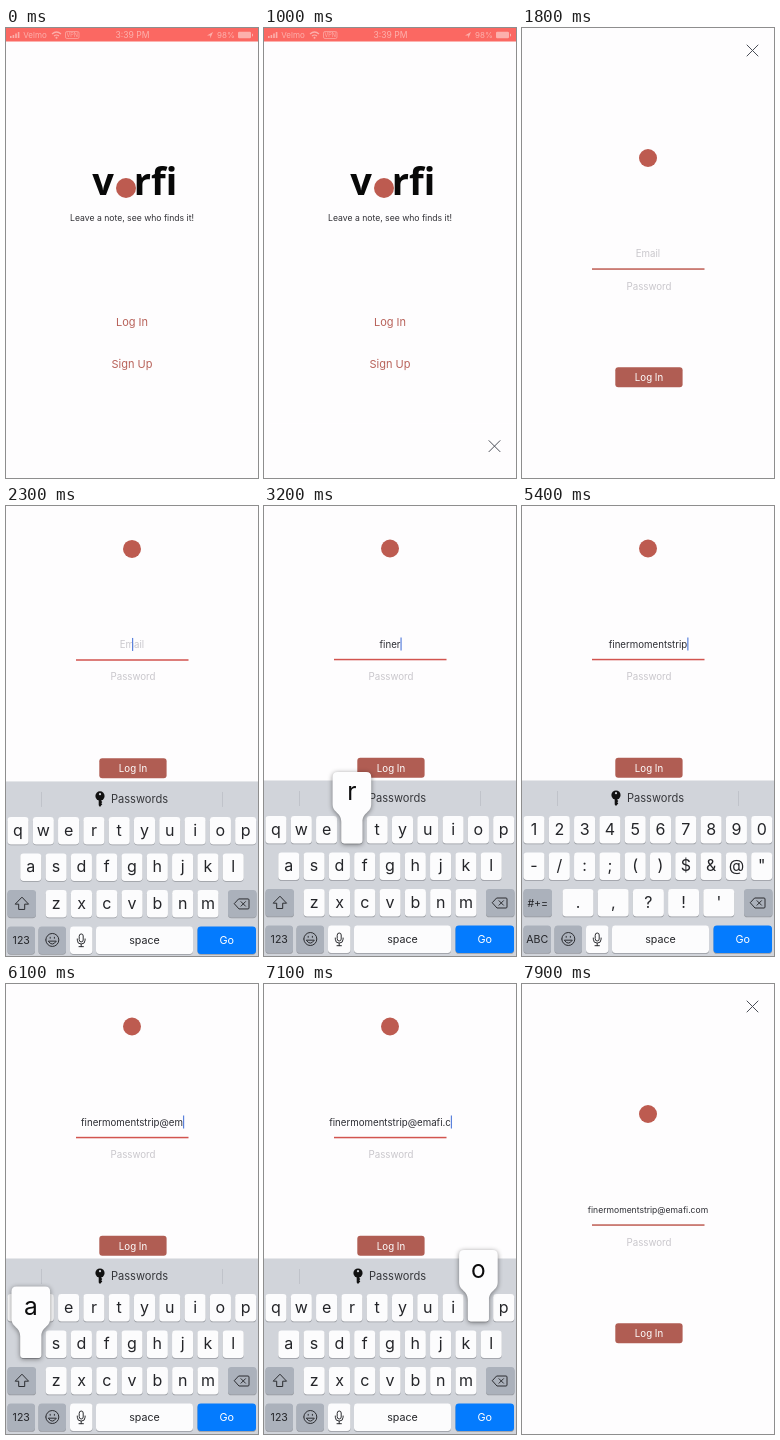
Recreate the animation shown at these times as an HTML page. Size 252x450 px, loop 8 s.

```html
<!DOCTYPE html>
<html lang="en">
<head>
<meta charset="utf-8">
<title>Log in</title>
<style>
html, body { margin: 0; width: 100%; height: 100%; overflow: hidden; background: #fefdfe; }
svg { display: block; width: 100%; height: 100%; }
text { font-family: Inter, sans-serif; text-anchor: middle; }
.line { fill: none; stroke: #2c2d31; stroke-width: 1; stroke-linecap: round; stroke-linejoin: round; }
.red { fill: #bd5b50; }
.link { fill: #b8625a; }
.hint { fill: #c9c7cc; }
</style>
</head>
<body>
<svg viewBox="0 0 252 450" xmlns="http://www.w3.org/2000/svg">
  <g id="welcome">
    <rect width="252" height="450" fill="#fefdfe"/>
    <rect width="252" height="13.5" fill="#fb6862"/>
    <g fill="#fcb0ac" font-size="8">
      <path d="M4 10V8h1.6v2zM6.6 10V7h1.6v3zM9.2 10V5.5h1.6V10zM11.8 10V4h1.6v6z"/>
      <text x="29" y="10">Velmo</text>
      <path d="M46 6q4.5-4 9 0M48 8q2.5-2 5 0" fill="none" stroke="#fcb0ac" stroke-width="1.2"/>
      <circle cx="50.5" cy="9.7" r="1"/>
      <rect x="59.5" y="3.5" width="13.5" height="7" rx="1.5" fill="none" stroke="#fcb0ac" stroke-width=".7"/>
      <text x="66.2" y="9" font-size="5.5">VPN</text>
      <text x="126.500" y="10" font-size="8.6">3:39 PM</text>
      <path d="M201 7.5l6-3.5-2.800 6.500v-3z"/>
      <text x="220" y="10">98%</text>
      <rect x="232" y="3.8" width="13" height="6.5" rx="1.2"/>
      <rect x="246" y="5.8" width="1" height="2.5"/>
    </g>
    <g font-size="38" font-weight="600" fill="#080808">
      <text x="97" y="167" style="font-family:'Noto Sans',sans-serif">v</text>
      <text x="149.500" y="167" style="font-family:'Noto Sans',sans-serif">rfi</text>
    </g>
    <circle class="red" cx="120" cy="160" r="10"/>
    <text x="126" y="193.300" font-size="8.650" fill="#303035">Leave a note, see who finds it!</text>
    <text id="loginLink" class="link" x="126" y="298" font-size="11">Log In</text>
    <text class="link" x="126" y="339.700" font-size="11">Sign Up</text>
  </g>
  <g id="modal">
    <rect width="252" height="640" fill="#fefdfe"/>
    <path d="M225 17l11 11M236 17l-11 11" class="line" style="stroke:#4a4e57"/>
    <circle class="red" cx="126" cy="130" r="9"/>
    <text id="email" x="126" y="229" font-size="9.680"></text>
    <rect id="caret" y="219" width="1.200" height="13" fill="#5b82dc"/>
    <rect id="rule" x="70" y="240.300" width="112.500" height="1.500"/>
    <text class="hint" x="127" y="261.500" font-size="9.750">Password</text>
    <rect x="93.300" y="339.300" width="67.300" height="20" rx="3" fill="#b05d53"/>
    <text x="127" y="353.200" font-size="9.700" fill="#fff">Log In</text>
  </g>
  <g id="keyboard">
    <rect y="274.500" width="252" height="176" fill="#d1d4da"/>
    <path d="M35.500 285v15M216.500 285v15" stroke="#c0c3ca"/>
    <circle cx="94" cy="289" r="4.600" fill="#111"/>
    <circle cx="94" cy="287.200" r="1.100" fill="#d1d4da"/>
    <path d="M92.700 292h2.600v2l1 1-1 1.200 1 1.200-1 1-1.300 1.600-1.300-1.600z" fill="#111"/>
    <text x="133.500" y="296.300" font-size="11.100" fill="#36373b">Passwords</text>
    <g id="letters"></g>
    <g id="symbols"></g>
    <g id="common"></g>
    <g id="popup">
      <path id="bubble" fill="#fdfdfe" style="filter:drop-shadow(0 1px 2.500px #0007)"/>
      <text id="bubbleText" font-size="24.500" fill="#0c0c0d"></text>
    </g>
  </g>
</svg>
<script>
const $ = id => document.getElementById(id);
const LOOP = 8000, LIFT = 87.5, KEY_HEIGHT = 27.5, PITCH = 25.3;
const ADDRESS = 'finermomentstrip@emafi.com';
const COMMIT = 70, HOLD = 130;
// Moments at which each character's key goes down
const presses = [
  2520, 2670, 2820, 2970, 3120, 3290, 3440, 3590, 3740, 3890, 4040, 4190, 4340, 4480, 4640, 4800,
  5420, 5860, 5980, 6080, 6230, 6400, 6740, 6960, 7080, 7260
];
const symbolSpans = [[5150, 5650], [6650, 6890]];
const rowY = [310, 346.5, 383, 419.5];
const keys = {};

function add(parent, tag, attrs, label = '') {
  const el = document.createElementNS('http://www.w3.org/2000/svg', tag);
  for (const name in attrs) el.setAttribute(name, attrs[name]);
  el.textContent = label;
  return $(parent).appendChild(el);
}

function addKey(parent, x, row, width, label = '', { fill = '#fcfcfd', color = '#242529', size = 16 } = {}) {
  const box = { x, width, height: KEY_HEIGHT, rx: 3.4 };
  add(parent, 'rect', { ...box, y: rowY[row] + 0.8, fill: '#96999f' });
  add(parent, 'rect', { ...box, y: rowY[row], fill });
  const y = rowY[row] + 13.8 + size * (size > 12 ? 0.31 : 0.36);
  add(parent, 'text', { x: x + width / 2, y, 'font-size': size, fill: color }, label);
}

function addRow(layout, chars, row, first, pitch = PITCH) {
  const width = pitch - 4.2;
  [...chars].forEach((char, i) => {
    const x = first + i * pitch;
    keys[char] = { x, row, width };
    addKey(layout, x - width / 2, row, width, char);
  });
}

const grey = { fill: '#abb1bb', size: 10.6 };
addRow('letters', 'qwertyuiop', 0, 12);
addRow('letters', 'asdfghjkl', 1, 24.8);
addRow('letters', 'zxcvbnm', 2, 50.2);
addKey('letters', 1.5, 2, 28.5, '', grey);
addKey('letters', 1.5, 3, 27.5, '123', grey);
add('letters', 'path', { class: 'line', d: 'M15.7 390.5l-6.5 6.7h3.5v5.3h6v-5.3h3.5z' });

addRow('symbols', '1234567890', 0, 12);
addRow('symbols', '-/:;()$&@"', 1, 12);
addRow('symbols', ".,?!'", 2, 56, 35.2);
addKey('symbols', 1.5, 2, 28.5, '#+=', grey);
addKey('symbols', 1.5, 3, 27.5, 'ABC', grey);

addKey('common', 222, 2, 28.5, '', grey);
addKey('common', 32.5, 3, 27.5, '', grey);
addKey('common', 64, 3, 22.5);
addKey('common', 90, 3, 97, 'space', { size: 10.7 });
addKey('common', 191.5, 3, 58.5, 'Go', { fill: '#047bfe', color: '#fff', size: 10.8 });
const icons = [
  'M233 392h9q1 0 1 1v8q0 1-1 1h-9l-4.5-5zM235 394.7l4.5 4.5M239.5 394.7l-4.5 4.5',
  'M39.8 433a6.5 6.5 0 1 0 13 0a6.5 6.5 0 1 0-13 0M42.5 434.5q3.8 5.5 7.6 0zM44.2 430.3v1M48.4 430.3v1',
  'M73.2 429a2 2 0 0 1 4 0v4a2 2 0 0 1-4 0zM71.3 432v1.2a3.9 3.9 0 0 0 7.8 0v-1.2M75.2 437.2v2.5M73 439.7h4.4'
];
icons.forEach(d => add('common', 'path', { class: 'line', d }));

const bubbleCenter = x => Math.max(20.5, Math.min(231.5, x));

function bubblePath({ x, row, width }) {
  const top = rowY[row] - 44, bottom = rowY[row] + KEY_HEIGHT, mid = bubbleCenter(x);
  const left = mid - 19.3, right = mid + 19.3, l = x - width / 2, r = x + width / 2;
  return `M${left + 5} ${top}H${right - 5}Q${right} ${top} ${right} ${top + 5}V${top + 32}
    C${right} ${top + 41} ${r} ${top + 40} ${r} ${top + 50}V${bottom - 3}Q${r} ${bottom} ${r - 3} ${bottom}
    H${l + 3}Q${l} ${bottom} ${l} ${bottom - 3}V${top + 50}
    C${l} ${top + 40} ${left} ${top + 41} ${left} ${top + 32}V${top + 5}Q${left} ${top} ${left + 5} ${top}Z`;
}

const easeOut = (t, start, length) => 1 - (1 - Math.max(0, Math.min(1, (t - start) / length))) ** 3;
const show = (id, on) => $(id).setAttribute('display', on ? 'inline' : 'none');
const move = (id, y) => $(id).setAttribute('transform', `translate(0 ${y})`);

function drawEmail(t, focused) {
  const count = presses.filter(p => t >= p + COMMIT).length;
  const email = $('email');
  email.textContent = count ? ADDRESS.slice(0, count) : 'Email';
  email.setAttribute('fill', count ? '#2c2d33' : '#c9c7cc');
  // The field shrinks its text once the address outgrows it
  email.setAttribute('font-size', [9.68, 9.1, 8.57][Math.max(0, count - 24)]);
  const half = count ? email.getComputedTextLength() / 2 : 0;
  $('caret').setAttribute('x', 126 + half);
  show('caret', focused);
  $('rule').setAttribute('fill', focused ? '#d2544f' : '#bf5e54');
}

function drawPopup(t) {
  const index = presses.filter(p => t >= p).length - 1;
  const active = index >= 0 && t < presses[index] + HOLD;
  show('popup', active);
  if (!active) return;
  const char = ADDRESS[index], key = keys[char];
  $('bubble').setAttribute('d', bubblePath(key));
  const label = $('bubbleText');
  label.textContent = char;
  label.setAttribute('x', bubbleCenter(key.x));
  label.setAttribute('y', rowY[key.row] - 16);
}

function draw(t) {
  const raised = easeOut(t, 1970, 400) - easeOut(t, 7560, 310);
  const symbols = symbolSpans.some(([a, b]) => t >= a && t < b);
  $('loginLink').setAttribute('opacity', t > 700 && t < 960 ? 0.35 : 1);
  move('modal', 450 * (1 - easeOut(t, 980, 500)) - LIFT * raised);
  move('keyboard', 185 * (1 - raised));
  show('letters', !symbols);
  show('symbols', symbols);
  drawEmail(t, t >= 1970 && t < 7560);
  drawPopup(t);
}

const begin = performance.now();
function tick() {
  draw((performance.now() - begin) % LOOP);
  requestAnimationFrame(tick);
}
tick();
</script>
</body>
</html>
```
